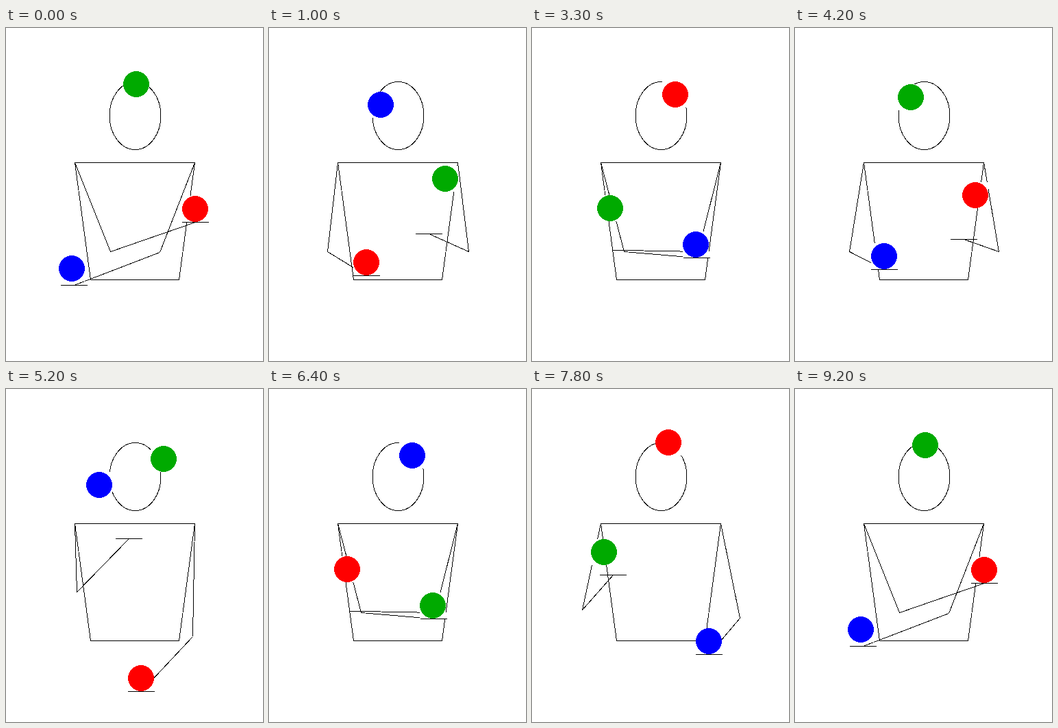
An HTML page for the animation above (9300 ms loop, 375 by 486 pixels).

```html
<!DOCTYPE html>
<html lang="en">
<head>
<meta charset="utf-8">
<title>Juggler</title>
<style>
html, body { margin: 0; width: 100%; height: 100%; overflow: hidden; background: #fff; }
svg { display: block; width: 100%; height: 100%; }
.body { fill: none; stroke: #000; stroke-width: 1; shape-rendering: crispEdges; }
.ball { shape-rendering: crispEdges; }
</style>
</head>
<body>
<svg viewBox="0 0 375 486">
  <g class="body">
    <ellipse cx="188.5" cy="128" rx="37.5" ry="49.5"/>
    <path d="M100.5 196.5H275.5L252.5 367.5H123.5Z"/>
    <path id="arms"/>
  </g>
  <g id="balls" class="ball"></g>
</svg>
<script>
const STEP = 100;      // ms per step
const CYCLE = 31;      // steps per hand cycle
const HOLD = 15.5;     // steps a ball stays in a hand
const LOOP = 3 * CYCLE;
const R = 19;

// caught: step of the catch; low, bend: scoop while holding;
// high: top of the empty return; peak, apex: the throw
const right = { side: 1, shoulder: 275, caught: 14, low: 445, bend: 1.298, high: 290, peak: 78, apex: 17.47 };
const left = { side: -1, shoulder: 101, caught: 29.5, low: 371, bend: 1.33, high: 214.5, peak: 81, apex: 14.88 };

const mod = (a, n) => ((a % n) + n) % n;
const px = v => Math.round(v) + 0.5;
const clamp = (v, lo, hi) => Math.min(hi, Math.max(lo, v));

// hand position, t steps after its catch
function handAt(h, t) {
  if (t < HOLD) {
    const u = t - 8.8;
    return { x: 282.2 - 12.2 * t, y: h.low - h.bend * u * u - 0.00642 * u ** 3 };
  }
  return { x: 93.1 + 12.2 * (t - HOLD), y: h.high + 1.258 * (t - 24.2) ** 2 };
}

// ball in a hand for HOLD steps, then in the air for a full cycle
function ballAt(s) {
  let t = mod(s - left.caught, LOOP), h = left;
  if (t >= HOLD + CYCLE) {
    t -= HOLD + CYCLE;
    h = right;
  }
  if (t < HOLD) {
    const p = handAt(h, t);
    return { x: p.x - 0.2, y: p.y - R };
  }
  const f = t - HOLD;
  return { x: 93 + 6.08 * f, y: h.peak + 0.948 * (f - h.apex) ** 2 };
}

function armPath(h, step) {
  const p = handAt(h, mod(step - h.caught, CYCLE));
  const mid = (196 + p.y) / 2;
  const ex = (h.shoulder + p.x) / 2 + h.side * 36.5;
  const ey = mid + clamp(326 - mid, 42.2, 88.7);
  const x = px(p.x), y = px(p.y);
  const sx = h === left ? 100.5 : 275.5;
  return `M${sx} 196.5L${px(ex)} ${px(ey)}L${x} ${y}M${x - R - 0.5} ${y}H${x + R + 0.5}`;
}

const arms = document.getElementById("arms");
const group = document.getElementById("balls");

function add(parent, name, attrs) {
  const el = document.createElementNS(group.namespaceURI, name);
  for (const k in attrs) el.setAttribute(k, attrs[k]);
  return parent.appendChild(el);
}

// each ball sits on an opaque white tile
const balls = [["#00f", 0], ["#f00", CYCLE], ["#0a0", -CYCLE]].map(([fill, lag]) => {
  const g = add(group, "g", {});
  add(g, "rect", { x: -R, y: -R, width: 2 * R, height: 2 * R, fill: "#fff" });
  add(g, "circle", { r: R, fill });
  return { g, lag };
});

function draw(ms) {
  // the first step repeats the last pose
  const step = Math.floor(ms / STEP) % LOOP || LOOP - 1;
  arms.setAttribute("d", armPath(left, step) + armPath(right, step));
  for (const b of balls) {
    const p = ballAt(step + b.lag);
    b.g.setAttribute("transform", `translate(${Math.round(p.x)} ${Math.round(p.y)})`);
  }
}

const start = performance.now();
function tick() {
  draw(performance.now() - start);
  requestAnimationFrame(tick);
}
tick();
</script>
</body>
</html>
```
